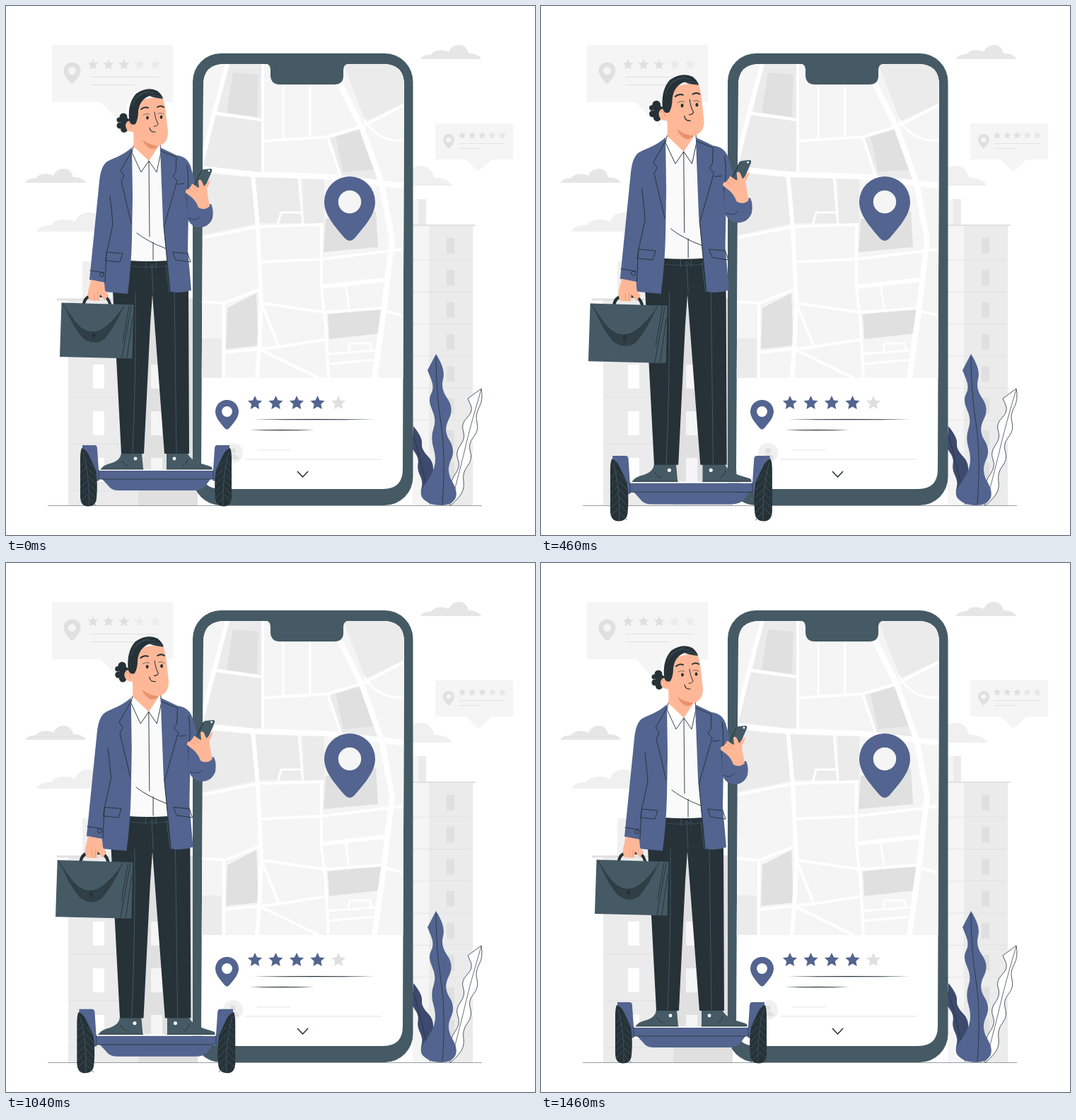
Write an HTML page with a canvas that moves like this. It is 748x748 px and loops after 1500 ms.

```html
<!DOCTYPE html>
<html lang="en">
<head>
<meta charset="utf-8">
<title>Rider with map review</title>
<style>
html, body { margin: 0; width: 100%; height: 100%; overflow: hidden; background: #fff; }
canvas { display: block; width: 748px; height: 748px; }
</style>
</head>
<body>
<canvas id="stage" width="748" height="748"></canvas>
<script>
const stage = document.getElementById('stage');
const BLUE = '#52648f', SLATE = '#455a64', INK = '#263238', SKIN = '#ffb897', BLUSH = '#e8936c';
const G1 = '#f5f5f5', G2 = '#ebebeb', G3 = '#e0e0e0';
let ctx;

function fill(d, color) {
  ctx.fillStyle = color;
  ctx.fill(new Path2D(d));
}
function line(d, color = INK, width = 0.9) {
  ctx.strokeStyle = color;
  ctx.lineWidth = width;
  ctx.stroke(new Path2D(d));
}
function rect(x, y, w, h, color) {
  ctx.fillStyle = color;
  ctx.fillRect(x, y, w, h);
}
function round(x, y, w, h, r, color) {
  ctx.fillStyle = color;
  ctx.beginPath();
  ctx.roundRect(x, y, w, h, r);
  ctx.fill();
}
function dot(x, y, r, color, ry = r) {
  ctx.fillStyle = color;
  ctx.beginPath();
  ctx.ellipse(x, y, r, ry, 0, 0, Math.PI * 2);
  ctx.fill();
}
function star(x, y, r, color) {
  ctx.fillStyle = color;
  ctx.beginPath();
  for (let i = 0; i < 10; i++) {
    const a = -Math.PI / 2 + i * Math.PI / 5, q = i % 2 ? r * 0.48 : r;
    ctx.lineTo(x + q * Math.cos(a), y + q * Math.sin(a));
  }
  ctx.fill();
}
function stars(x, y, step, r, lit, on, off) {
  for (let i = 0; i < 5; i++) star(x + i * step, y, r, i < lit ? on : off);
}
function pin(x, y, r, color, hole) {
  ctx.save();
  ctx.translate(x, y);
  ctx.scale(r, r);
  fill('M-1 0A1 1 0 0 1 1 0C1 .5 .6 .95 .18 1.44Q0 1.62 -.18 1.44C-.6 .95 -1 .5 -1 0Z', color);
  ctx.restore();
  dot(x, y, r * 0.45, hole);
}
function cloud(x, y, s, color) {
  ctx.save();
  ctx.translate(x, y);
  ctx.scale(s, s);
  fill('M0 0Q4-7 15-6.500Q20-13 29-12.500Q36-13 40-10Q44-20 55-20Q65-20 68-8Q82-8 86 0Z', color);
  ctx.restore();
}
// Thin rule that tapers to both ends
function taper(x0, x1, y, color) {
  const mid = (x0 + x1) / 2;
  fill(`M${x0} ${y}Q${mid} ${y - 1.3} ${x1} ${y}Q${mid} ${y + 1.3} ${x0} ${y}Z`, color);
}

// Smooth outline through [x, y] points
function leaf(points, color, edge) {
  ctx.beginPath();
  ctx.moveTo(...points[0]);
  for (let i = 1; i < points.length - 1; i++) {
    const [x, y] = points[i], [nx, ny] = points[i + 1];
    ctx.quadraticCurveTo(x, y, (x + nx) / 2, (y + ny) / 2);
  }
  ctx.lineTo(...points.at(-1));
  ctx.closePath();
  ctx.fillStyle = color;
  ctx.fill();
  if (edge) {
    ctx.strokeStyle = edge;
    ctx.lineWidth = 0.8;
    ctx.stroke();
  }
}

function bubbles() {
  fill('M65 55H236V136H171L169 172L134 136H65Z', G1);
  pin(93.5, 91.5, 12, G3, G1);
  stars(123, 83, 22, 8, 3, G3, G2);
  line('M120 100.500H216M120 111.500H182', G3, 1);

  fill('M607 166H717V217H687L668 234L650 217H607Z', G1);
  pin(626, 189, 8, G3, G1);
  stars(645, 183, 14.2, 5.6, 3, G3, '#e6e6e6');
  line('M641 194.500H705M641 201.500H672', G3, 0.9);
}

function buildings() {
  rect(575, 273, 8, 37, G1);
  rect(583, 273, 11, 37, G2);
  rect(575, 310, 24, 397, G1);
  rect(598, 310, 62, 397, G2);
  rect(575, 309, 89, 2, G3);
  for (let i = 0; i < 8; i++) {
    rect(623, 328 + i * 45.3, 11, 22, G3);
    if (i) line(`M575 ${314 + i * 45.3}H660`, '#e3e3e3', 0.9);
  }

  rect(108, 361, 100, 54, '#f0f0f0');
  rect(88, 415, 100, 292, G2);
  rect(187, 415, 84, 292, G3);
  rect(72, 413.5, 199, 3, G3);
  for (const y of [507, 573, 639]) {
    rect(123, y, 16, 34, '#fff');
    rect(205, y, 16, 34, G1);
    line(`M88 ${y + 46}H271`, G3, 1);
  }
}

function plants() {
  leaf([[576, 594], [589, 610], [587, 627], [605, 645], [603, 668], [610, 706], [597, 703],
        [585, 690], [590, 673], [581, 655], [584, 640], [574, 625]], '#3d4a6e');
  line('M576 607Q589 650 600 705', INK, 0.8);
  leaf([[672, 541], [675, 557], [663, 578], [669, 600], [653, 619], [660, 641], [645, 660],
        [649, 685], [630, 706], [626, 706], [630, 690], [628, 672], [643, 651], [635, 631],
        [650, 611], [643, 591], [661, 573], [653, 555]], '#fff', INK);
  line('M672 542Q657 592 650 622T629 704', INK, 0.7);
  leaf([[608, 492], [622, 514], [614, 541], [634, 569], [618, 600], [636, 628], [622, 657],
        [640, 688], [630, 706], [600, 706], [582, 690], [602, 664], [609, 640], [600, 610],
        [609, 585], [596, 557], [606, 540], [596, 515]], BLUE);
  line('M608 496Q608 545 615 590T617 705', INK, 0.8);
}

function map() {
  rect(270, 80, 300, 446, G1);
  for (const d of [
    'M314 82H363V160L299 151Z', 'M297 155L361 163V235L276 227Z',
    'M277 236L348 242L353 308L277 324Z', 'M352 242H415L419 307H356Z',
    'M419 243H450V308H421Z', 'M477 82H562V138L508 163Z', 'M455 187L504 170L531 248L471 241Z',
    'M277 470H305V526H277Z'
  ]) fill(d, G2);
  for (const d of [
    'M321 94L357 97L355 157L312 151Z', 'M466 185L500 175L521 231L477 235Z',
    'M452 301L523 290L526 341L449 348Z', 'M313 427L354 406L357 480L311 485Z',
    'M455 436L532 428L529 463L457 471Z'
  ]) fill(d, G3);

  line('M276 230L350 238L450 241L562 254M471 108L503 172L531 250L546 330L534 432L521 526', '#fff', 8);
  line('M313 82L292 160L273 238M349 238L356 312L361 420L358 485L355 526M447 397L536 387', '#fff', 6);
  line('M294 151L362 161M363 82V234M363 191L455 185L505 170L562 140M455 185L473 240'
     + 'M277 328L356 312L449 309M446 310V400L452 450L456 526M358 362L446 358L562 344'
     + 'M277 418L309 420L358 401M308 420V526M308 490L386 482L455 471M360 420L450 433L536 427'
     + 'M360 486L442 526M361 420L386 482M536 431L562 438', '#fff', 4);
  line('M392 110V190M430 110V187M414 241L420 310M384 310L389 292H420M480 393L485 427'
     + 'M506 160Q526 193 562 190M455 492L522 487M484 488L486 477H515L516 488M455 506L524 500', '#fff', 3);
}

function phone() {
  round(264, 67, 311.5, 639, 40, SLATE);
  ctx.save();
  ctx.clip(new Path2D('M279 112Q279 82 309 82H533Q563 82 563 112L561 655Q561 683 533 683H304Q276 683 276 655Z'));
  rect(270, 80, 300, 610, '#fff');
  map();
  ctx.restore();
  fill('M366 81Q374 82 374 90V99Q375 111 387 111H464Q477 111 477 99V90Q477 82 486 81Z', SLATE);

  pin(486, 277, 36, BLUE, G1);
  pin(312.5, 573.5, 16.5, BLUE, '#fff');
  stars(352, 561.5, 29.5, 10.6, 4, BLUE, G3);
  taper(349, 521, 584.7, INK);
  taper(344, 436, 599.7, INK);
  line('M355 628H402M338 641H531', G3, 0.9);
  dot(321, 632, 14, '#f0f0f0');
  dot(321, 629, 4, G3);
  fill('M313 641Q313 634 321 634Q329 634 329 641Z', G3);
  line('M412 658L419.500 666L427 658', INK, 1.6);
}

// Left wheel and fender; the right one is its mirror image
function wheel() {
  fill('M108 621H125Q129 621 129 626L131 656V671L125 673L108 650Z', BLUE);
  line('M126 655V672M131 656V671', INK, 0.7);
  fill('M107 625Q114 627 119 639L127 656Q130 675 128 696Q127 707.500 116 707.500Q105 707.500 105 693V640Q105 630 107 625Z', INK);
  line('M109 631Q118 660 117 706', SLATE, 0.8);
  for (let y = 645; y < 704; y += 10) line(`M106 ${y + 5}L115 ${y - 4}M117 ${y}L127 ${y + 11}`, SLATE, 0.8);
}

function board() {
  fill('M136 669H289L281 680Q275 685 266 685H160Q151 685 147 681Z', BLUE);
  rect(128, 657, 165, 12, BLUE);
  line('M129 669H293', INK, 0.8);
  rect(131, 655, 162, 2, '#fff');
  wheel();
  ctx.save();
  ctx.translate(424, 0);
  ctx.scale(-1, 1);
  wheel();
  ctx.restore();
}

function legs() {
  fill('M163 632H192L194 655H134Q137 649 150 646Q162 642 163 632Z', SLATE);
  fill('M227 632H256Q262 643 276 647L289 651Q293 653 291 655H227Z', SLATE);
  line('M134 655H194M227 655H291M164 643Q166 648 172 650M257 641Q256 647 250 650', INK, 0.9);
  dot(183, 640, 2.4, '#fff');
  dot(238, 640, 2.4, '#fff');
  fill('M170 358H232L255 385L258 405L259 633H224L207 408L204 450L195 633H163L151 402Z', INK);
  line('M183 405Q184 520 179 632M238 400L241 632M206 365L208 405M226 365L231 405M198 362V371M212 362V371', SLATE, 0.9);
  line('M178 368Q205 371 232 367', SLATE, 0.6);
  dot(206.5, 367, 2.2, SLATE);
  dot(206.5, 367, 1.5, INK);
}

function torso() {
  fill('M180 195L176 225L175 360Q200 362 229 360L226 220L218 195L204 218Z', '#fafafa');
  fill('M181 185L180 200L202 221L214 205L215 188Z', SKIN);
  fill('M180 198L178 207L191 235L202 219ZM218 195L202 219L213 235L219 207Z', '#fff');
  line('M180 198L178 207L191 235L202 219L213 235L219 207L218 195M202 219L203 326M208 334V359M185 321Q200 333 226 343');

  fill('M178 200C165 212 151 215 143 220Q134 226 132 248L118 387L139 391L139 404L172 407Q177 370 178 330L179 270Z', BLUE);
  fill('M218 200L241 211Q258 213 262 230L267 248L258 290L257 345L262 402Q247 407 232 404L222 305Z', BLUE);
  line('M178 205L162 233L167 240L163 248L177 307M219 205L241 214L240 235L236 241L242 247L224 310');
  line('M147 268Q150 295 151 309L142 350L140 390M143 348L165 350L161 362L141 360ZM236 348L257 350L261 362L240 359ZM243 252L252 251');
  line('M256 225Q260 250 255 267L258 300M232 404L223 310M119 374L139 377');
  ctx.beginPath();
  ctx.arc(135.5, 380, 2.8, 0, Math.PI * 2);
  ctx.stroke();
}

function phoneHand() {
  fill('M255 258L257 302Q263 313 273 313Q287 313 292 300Q294 288 290 280L273 283L263 266Z', BLUE);
  line('M258 300Q267 305 274 298', INK, 0.7);
  fill('M276 233Q277 231 280 231L289 230Q292 230 291 234L281 257Q279 261 275 261L264 259Z', SLATE);
  line('M276 233L264 258L270 261', INK, 1);
  dot(287, 233, 1.4, '#fff');
  fill('M254 264Q253 259 258 259L262 254Q262 251 265 252L270 256L273 257L272 247Q275 244 277 248L280 255L288 246Q290 248 284 258L285 267L288 283Q281 290 272 285Q269 276 262 270Z', SKIN);
  line('M258 259L266 263M263 255L270 261', BLUSH, 0.7);
}

function briefcase() {
  line('M110 421Q112 410 123 410H136Q144 411 147 421', INK, 4);
  fill('M120 387L139 391L140 402L145 409L140 416L133 408L132 417L118 416Q114 407 117 400Z', SKIN);
  line('M125 406V416M130 405V416', BLUSH, 0.7);
  fill('M78.500 419.500L180.500 422.500L178.500 498.500L76 496Z', SLATE);
  fill('M84 428Q97 449 107 456Q124 468 141 454Q156 442 165 428Q153 455 139 471Q124 482 108 469Q95 454 84 428Z', '#303f46');
  line('M80 421Q97 448 107 456Q124 468 141 454Q156 442 167 424', INK, 0.9);
  line('M177 425L164 497M179 440L171 497M174 424L165 475');
  dot(124, 465.500, 2.6, INK);
  line('M124 461V471', INK, 1.5);
}

function head() {
  for (const [x, y, r] of [[166, 157, 5.5], [169, 165, 7], [161, 169, 4.5], [167, 174, 5], [160, 161, 3.5]]) dot(x, y, r, INK);
  fill('M184 134L220 127Q225 137 226 151L229 178Q229 196 214 198Q209 198 207 197L205 205L181 200L180 178Q170 179 169 169Q170 160 180 163Z', SKIN);
  fill('M193 189Q203 197 216 198Q211 203 204 202Q196 197 193 189Z', BLUSH);
  fill('M174 161Q172 137 184 124Q200 113 214 120Q221 126 222 131Q210 130 203 127Q189 132 187 149Q187 160 183 167Q176 170 174 161Z', INK);
  line('M181 131Q195 119 210 123M178 142Q184 125 203 119M203 127Q211 125 220 129', SLATE, 0.7);
  line('M172 166Q178 166 177 173', BLUSH, 0.8);
  line('M191 146Q196 142 201 144M214 143Q219 140 223 143', INK, 2);
  line('M194 154Q198 151 203 153M215 152Q219 150 223 153', INK, 0.6);
  dot(200, 158, 1.9, INK, 2.5);
  dot(219.5, 157, 1.9, INK, 2.5);
  line('M210 150Q211 160 215 167Q213 171 209 170', INK, 1);
  line('M203 172Q204 179 211 178', INK, 1.2);
}

function rider() {
  board();
  legs();
  torso();
  phoneHand();
  briefcase();
  head();
}

// Two uneven heartbeats: [ms, share of the 10 % growth]
const BEAT = [[0, 0], [275, 1], [880, 0], [1042, 0.46], [1083, 0.67], [1145, 0.94], [1167, 0.9], [1458, 0], [1500, 0]];
const LOOP = 1500, STEP = LOOP / 36, PIVOT = [206, 406];

function growth(t) {
  const i = BEAT.findIndex(([end]) => t < end);
  const [t0, a] = BEAT[i - 1], [t1, b] = BEAT[i];
  return a + (b - a) * (t - t0) / (t1 - t0);
}

const backdrop = document.createElement('canvas');
backdrop.width = backdrop.height = 748;
ctx = backdrop.getContext('2d');
ctx.lineJoin = 'round';
rect(0, 0, 748, 748, '#fff');
bubbles();
cloud(586, 75, 1, '#e6e6e6');
cloud(27, 250, 1, '#e6e6e6');
cloud(43, 319, 1.36, '#f0f0f0');
cloud(510, 254, 1.4, '#f0f0f0');
buildings();
line('M59 706.500H673', '#7d878c', 0.8);
plants();
phone();

ctx = stage.getContext('2d');
ctx.lineJoin = ctx.lineCap = 'round';
const start = performance.now();

function draw(now) {
  const elapsed = Math.max(0, now - start) % LOOP;
  const t = Math.floor((elapsed + 5) / STEP) * STEP % LOOP;
  const s = 1 + 0.1 * growth(t);
  ctx.drawImage(backdrop, 0, 0);
  ctx.save();
  ctx.translate(...PIVOT);
  ctx.scale(s, s);
  ctx.translate(-PIVOT[0], -PIVOT[1]);
  rider();
  ctx.restore();
  requestAnimationFrame(draw);
}
draw(start);
</script>
</body>
</html>
```
